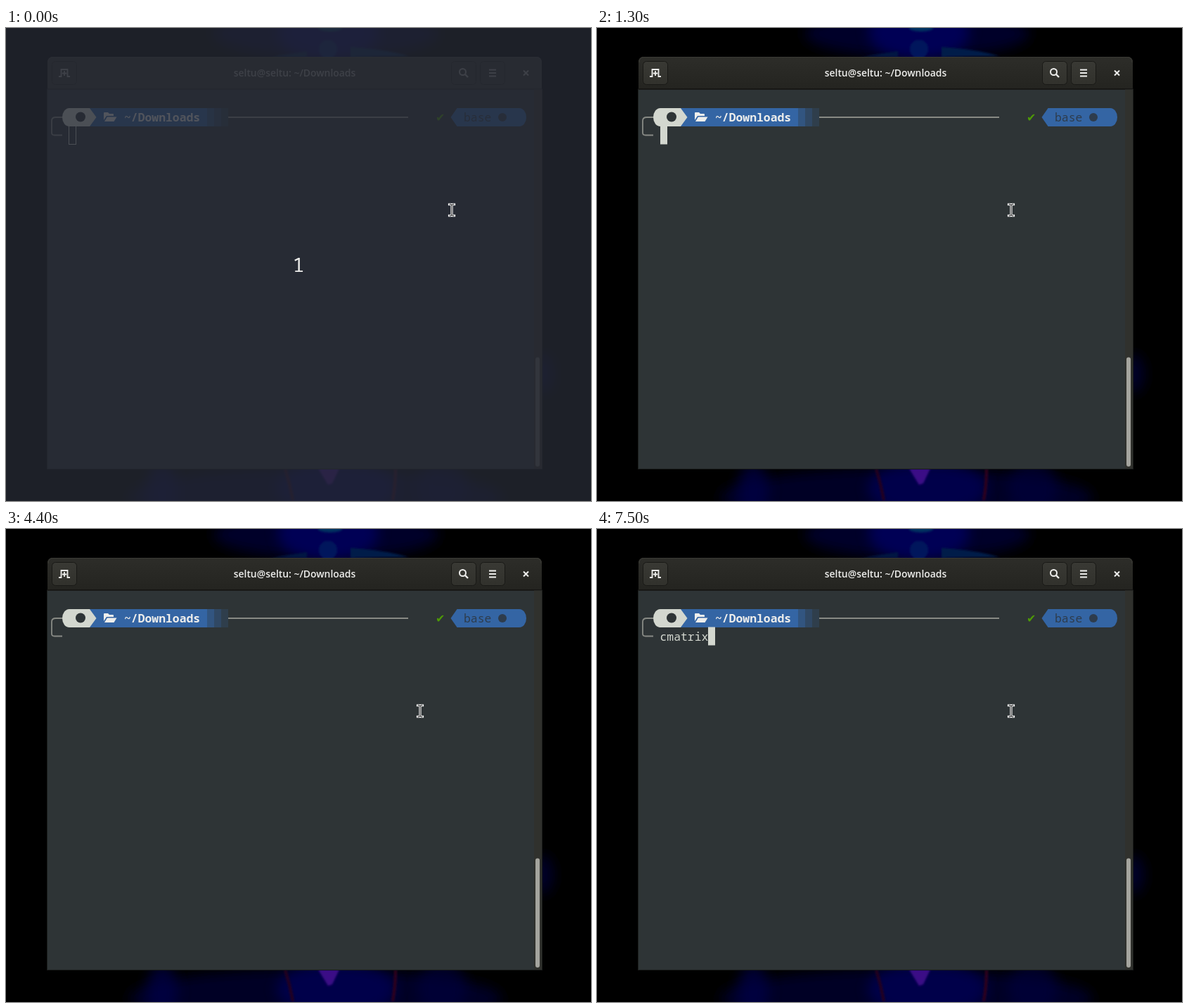
Recreate the animation shown at these times as an HTML page. Size 832 px wide and 673 px high, loop 8000 ms.

```html
<!DOCTYPE html>
<html lang="en">
<head>
<meta charset="utf-8">
<title>Terminal</title>
<style>
  html, body { margin: 0; width: 100%; height: 100%; overflow: hidden; background: #000; }
  svg { display: block; width: 832px; height: 673px; }
  text { white-space: pre; }
  .mono { font: 16.4px "Noto Sans Mono", monospace; }
  .title { font: 600 13.9px "Open Sans", "Noto Sans", sans-serif; text-anchor: middle; }
</style>
</head>
<body>
<svg id="stage" viewBox="0 0 832 673" xmlns="http://www.w3.org/2000/svg"></svg>
<script>
const LOOP = 8000, CELL = 9.85, PROMPT_X = 89.5;
const stage = document.getElementById('stage');

const rect = (x, y, w, h, fill, extra = '') =>
  `<rect x="${x}" y="${y}" width="${w}" height="${h}" fill="${fill}" ${extra}/>`;
const path = (d, fill, extra = '') => `<path d="${d}" fill="${fill}" ${extra}/>`;
const line = (d, color, width, extra = '') =>
  path(d, 'none', `stroke="${color}" stroke-width="${width}" ${extra}`);
const gradient = (id, top, bottom) =>
  `<linearGradient id="${id}" x2="0" y2="1"><stop stop-color="${top}"/><stop offset="1" stop-color="${bottom}"/></linearGradient>`;
const glow = (x, y, rx, ry, color, opacity) =>
  `<ellipse cx="${x}" cy="${y}" rx="${rx}" ry="${ry}" fill="${color}" opacity="${opacity}" filter="url(#soft)"/>`;

const defs = `<defs>
  ${gradient('barOn', '#2d2d29', '#242420')}
  ${gradient('buttonOn', '#393934', '#31312c')}
  <filter id="soft" x="-50%" y="-80%" width="200%" height="260%"><feGaussianBlur stdDeviation="9"/></filter>
  <filter id="fine" x="-30%" y="-30%" width="160%" height="160%"><feGaussianBlur stdDeviation="1.5"/></filter>
</defs>`;

const wallpaper = rect(0, 0, 832, 673, '#000') +
  glow(455, 8, 160, 34, '#00002e', 0.9) +
  glow(458, 6, 72, 40, '#000060', 0.8) +
  glow(440, 668, 265, 42, '#00002c', 0.9) +
  glow(222, 658, 22, 40, '#000048', 0.7) +
  glow(470, 655, 85, 40, '#00005a', 0.7) +
  glow(620, 655, 35, 40, '#000040', 0.6) +
  glow(764, 492, 14, 28, '#00002e', 0.9) +
  `<g filter="url(#fine)">
    <circle cx="458" cy="30" r="13" fill="#02195c"/>
    <ellipse cx="461" cy="0" rx="17" ry="5" fill="#043060"/>
    ${path('M376 41 L428 33 V41Z', '#031942')}
    ${path('M490 27 Q540 30 573 40 L490 41Z', '#031b4a')}
    ${path('M444 627 H474 L464 648 L458 650Z', '#3b0c86')}
    ${line('M397 627 Q404 650 408 672', '#28041f', 4)}
    ${line('M554 627 Q554 650 550 672', '#30041f', 4)}
  </g>`;

function chrome(focused) {
  const ink = focused ? '#eeeeec' : '#92928d';
  const bar = focused ? 'url(#barOn)' : '#34332f';
  const button = x => rect(x, 47.5, 35, 33, focused ? 'url(#buttonOn)' : '#34332f',
    `rx="5" stroke="${focused ? '#191916' : '#20201c'}"`);
  return path('M59 87 V49 Q59 41 67 41 H754 Q762 41 762 49 V87Z', bar) +
    line('M60 49 Q60 41.5 67 41.5 H754 Q761 41.5 761 49', focused ? '#3a3a35' : '#3c3b37', 1) +
    rect(59, 86, 703, 1.5, focused ? '#151513' : '#22221f') +
    button(65.5) + button(633.5) + button(674.5) +
    line('M75 69 H78.5 V59 H87.5 V69 H91 M83 61 V68 M79.8 64.5 H86.2', ink, 1.8) +
    `<circle cx="649.5" cy="62.5" r="4.5" fill="none" stroke="${ink}" stroke-width="2"/>` +
    line('M653 66 L657 70', ink, 2.4) +
    line('M687 59.5 H697 M687 64 H697 M687 68.5 H697', ink, 2) +
    line('M736 60.5 L743 67.5 M743 60.5 L736 67.5', ink, 2) +
    `<text class="title" x="410.5" y="69" fill="${ink}">seltu@seltu: ~/Downloads</text>` +
    rect(751, 87.5, 11, 539.5, focused ? '#30312d' : '#302f2b') +
    rect(753, 468.5, 6, 155.5, focused ? '#a4a49e' : '#5f605c', 'rx="3"');
}

const fades = [0.68, 0.42, 0.2].map((a, i) =>
  rect(286 + i * 10, 114, 10, 26, '#3465a4', `opacity="${a}"`)).join('');

const prompt =
  line('M80 127 H71 Q65 127 65 132 V149 Q65 152.5 69 152.5 H80', '#888a85', 1.8) +
  line('M316 127 H572', '#888a85', 1.8) +
  rect(118, 114, 168, 26, '#3465a4') + fades +
  path('M90 114 H119 L128.5 127 L119 140 H90 A10 13 0 0 1 90 114Z', '#d3d7cf') +
  '<circle cx="106" cy="126.5" r="7" fill="#2e3436"/>' +
  path('M139 131 V121 Q139 120 140 120 H145 L147 122 H152 Q153 122 153 123 V125 H143Z M140 133 L144 126.5 H157.5 L153.5 133Z', '#eeeeec') +
  '<text class="mono" x="168" y="133" fill="#eeeeec" font-weight="700" style="font-weight:700">~/Downloads</text>' +
  '<text x="611" y="133" fill="#4e9a06" style="font:16px \'DejaVu Sans\',sans-serif">✔</text>' +
  path('M641.5 114 H730 A10 13 0 0 1 730 140 H641.5 L632.5 127Z', '#3465a4') +
  '<text class="mono" x="651" y="133" fill="#2e3c4c">base</text>' +
  '<circle cx="706" cy="127" r="6" fill="#2e3c4c"/>';

const beam = 'M-3.5 -8 H-1 L0 -7 L1 -8 H3.5 M0 -7 V7 M-3.5 8 H-1 L0 7 L1 8 H3.5';

stage.innerHTML = defs + wallpaper +
  rect(58.5, 87, 704, 540.5, '#2e3436', 'stroke="#1b1d1c"') +
  chrome(false) + `<g id="focus">${chrome(true)}</g>` + prompt +
  '<text id="typed" class="mono" x="89.5" y="158.5" fill="#d3d7cf"></text>' +
  rect(0, 139.5, 10, 26, '#d3d7cf', 'id="caret"') +
  `<g id="veil">${rect(0, 0, 832, 673, '#262a34', 'opacity="0.78"')}
    <text x="416" y="347" fill="#eeeeec" text-anchor="middle" style="font:28px 'Noto Sans Mono',monospace">1</text></g>
  <g id="pointer">${line(beam, '#fff', 3.2, 'stroke-linecap="square"')}${line(beam, '#111', 1)}</g>`;

const [focus, typed, caret, veil, pointer] =
  ['focus', 'typed', 'caret', 'veil', 'pointer'].map(id => document.getElementById(id));

// Each track holds its value until the next listed time.
const typing = [[0, ''], [5500, 'c'], [6100, ''], [6300, 'c'], [6600, 'cm'], [6700, 'cma'],
  [7000, 'cmat'], [7100, 'cmatr'], [7300, 'cmatri'], [7500, 'cmatrix']];
const blink = [[0, true], [700, false], [1300, true], [2000, false], [2500, true],
  [3200, false], [3800, true], [4400, false], [5000, true]];
const pointerX = [[0, 634], [200, 624], [300, 604], [400, 594.5], [600, 591], [700, 589]];
const focusLevel = [[0, 0], [200, 0.5], [300, 0.87], [400, 1]];
const at = (track, t) => track.reduce((value, [time, next]) => t >= time ? next : value, track[0][1]);

function render(t) {
  const word = at(typing, t);
  const hollow = t < 200;
  typed.textContent = word;
  caret.setAttribute('x', Math.round(PROMPT_X + word.length * CELL) - (hollow ? 0.5 : 0));
  caret.setAttribute('fill', hollow ? 'none' : '#d3d7cf');
  caret.setAttribute('stroke', hollow ? '#d3d7cf' : 'none');
  caret.setAttribute('visibility', at(blink, t) ? 'visible' : 'hidden');
  focus.setAttribute('opacity', at(focusLevel, t));
  veil.setAttribute('visibility', t < 100 ? 'visible' : 'hidden');
  pointer.setAttribute('transform', `translate(${at(pointerX, t)} 259)`);
}

const start = performance.now();
function tick() {
  render((performance.now() - start) % LOOP);
  requestAnimationFrame(tick);
}
tick();
</script>
</body>
</html>
```
